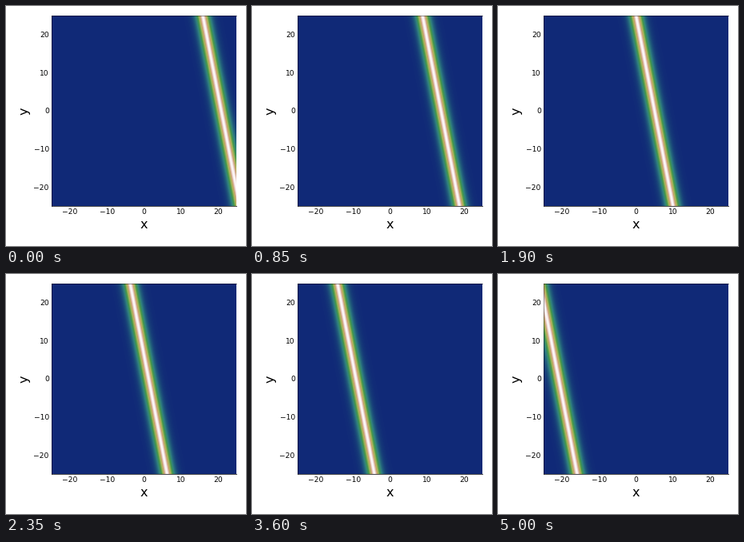
Write a matplotlib script that moves like this. It is 300 px wide and 300 px high and loops after 5050 ms.

```python
import numpy as np
import matplotlib.pyplot as plt
from matplotlib.animation import FuncAnimation

SIZE, DPI = 300, 100
FRAMES, STEP_MS = 101, 50
HALF = 25
SPEED, TILT, WIDTH = 0.42, 0.2, 0.7

plt.rcParams["font.family"] = "DejaVu Sans"


def pt(px):
    return px * 72 / DPI


def wave(frame):
    """Line soliton travelling left, centred on the origin mid-loop."""
    shift = SPEED * (frame - FRAMES // 2)
    return 1 / np.cosh(WIDTH * (X + TILT * Y + shift)) ** 2


fig = plt.figure(figsize=(SIZE / DPI, SIZE / DPI), dpi=DPI, facecolor="white")
left, right, top, bottom = 57, 288, 12, 250
ax = fig.add_axes([left / SIZE, 1 - bottom / SIZE,
                   (right - left) / SIZE, (bottom - top) / SIZE])

axis = np.linspace(-HALF, HALF, 251)
X, Y = np.meshgrid(axis, axis)
image = ax.imshow(wave(0), cmap="gist_earth", vmin=-0.11, vmax=1, origin="lower",
                  extent=(-HALF, HALF, -HALF, HALF), aspect="auto",
                  interpolation="bilinear")

ax.set_xticks(range(-20, 21, 10))
ax.set_yticks(range(-20, 21, 10))
ax.tick_params(length=0, pad=pt(3.2), labelsize=pt(9.2))
for side, alpha in (("left", 0.4), ("bottom", 0.7), ("top", 0.4), ("right", 0)):
    ax.spines[side].set(linewidth=pt(1), color="black", alpha=alpha)

fig.text(172.6 / SIZE, 1 - 273 / SIZE, "x", size=pt(16), ha="center", va="center")
fig.text(23.5 / SIZE, 1 - 131 / SIZE, "y", size=pt(16), rotation=90,
         ha="center", va="center")


def draw(frame):
    image.set_data(wave(frame))
    return [image]


anim = FuncAnimation(fig, draw, frames=FRAMES, interval=STEP_MS,
                     repeat=True, repeat_delay=0, blit=False)
plt.show()
```
